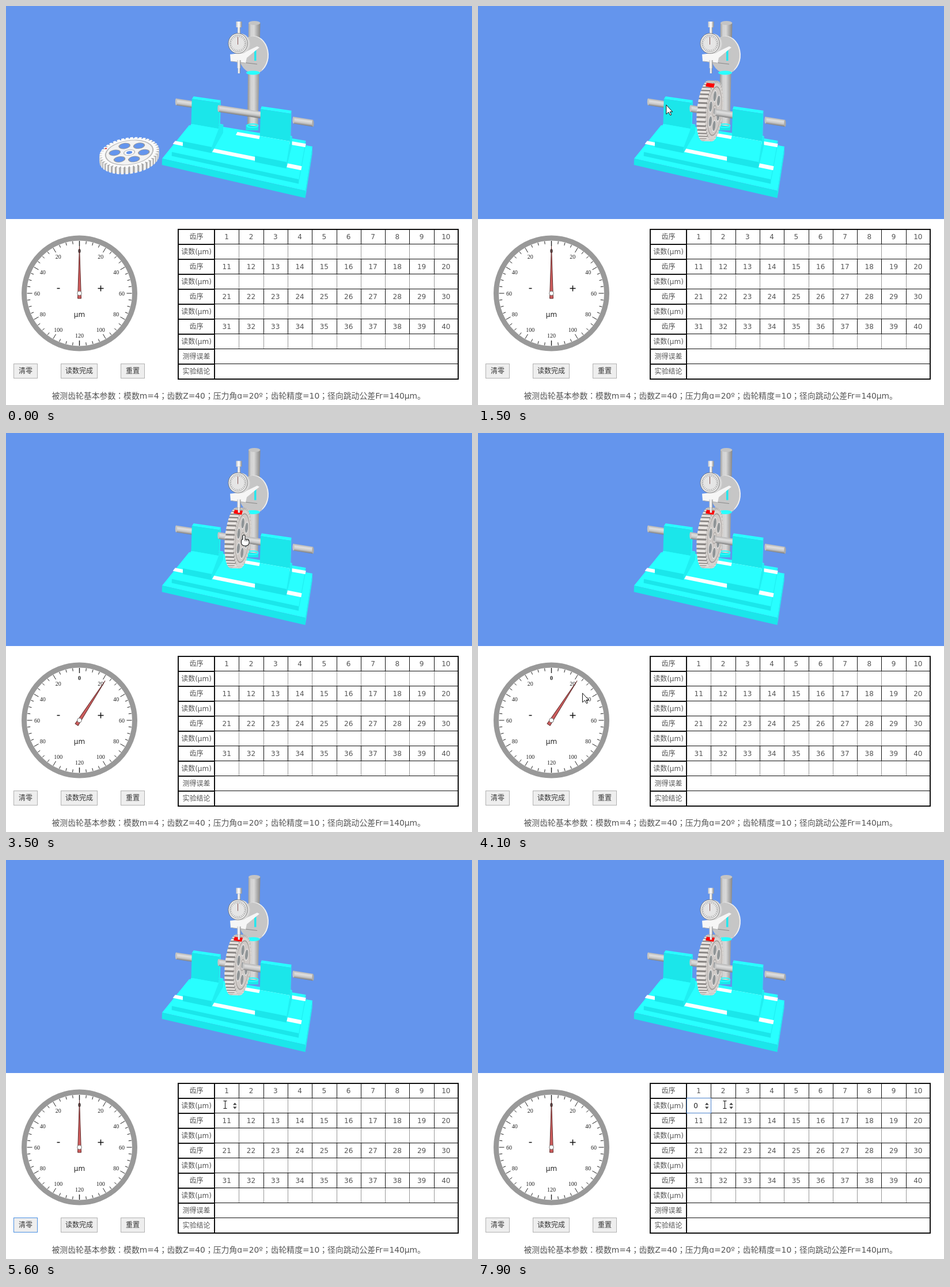
Recreate the animation shown at these times as an HTML page with a canvas. Size 809 px wide and 693 px high, loop 8 s.

```html
<!DOCTYPE html>
<html>
<head>
<meta charset="utf-8">
<title>齿轮径向跳动测量</title>
<style>
  html, body { margin: 0; width: 100%; height: 100%; overflow: hidden; background: #fff; }
  canvas { display: block; }
</style>
</head>
<body>
<canvas id="stage" width="809" height="693"></canvas>
<script>
const ctx = document.getElementById('stage').getContext('2d');
const LOOP = 8000, TAU = Math.PI * 2;
const SANS = '"DejaVu Sans", "Noto Sans CJK SC", sans-serif';
const PARAMS = '"DejaVu Sans", "Noto Sans CJK JP", sans-serif';
const SERIF = '"Liberation Serif", serif';
const SKY = '#6495ed', TOP = '#28ffff', FRONT = '#1be6ea', SIDE = '#20eff2';
const clamp = v => Math.max(0, Math.min(1, v));
const mix = (a, b, p) => a + (b - a) * p;

function poly(fill, points, stroke) {
  ctx.beginPath();
  for (const [x, y] of points) ctx.lineTo(x, y);
  ctx.closePath();
  ctx.fillStyle = fill;
  ctx.fill();
  if (stroke) { ctx.strokeStyle = stroke; ctx.lineWidth = 1; ctx.stroke(); }
}
function line(color, width, x1, y1, x2, y2) {
  ctx.strokeStyle = color;
  ctx.lineWidth = width;
  ctx.beginPath();
  ctx.moveTo(x1, y1);
  ctx.lineTo(x2, y2);
  ctx.stroke();
}
function oval(fill, x, y, rx, ry = rx, rot = 0, stroke, width = 1) {
  ctx.beginPath();
  ctx.ellipse(x, y, rx, ry, rot, 0, TAU);
  if (fill) { ctx.fillStyle = fill; ctx.fill(); }
  if (stroke) { ctx.strokeStyle = stroke; ctx.lineWidth = width; ctx.stroke(); }
}
function rect(fill, x, y, w, h) {
  ctx.fillStyle = fill;
  ctx.fillRect(x, y, w, h);
}
function frame(color, x, y, w, h, width = 1) {
  ctx.strokeStyle = color;
  ctx.lineWidth = width;
  ctx.strokeRect(x, y, w, h);
}
function text(str, x, y, font, color, align = 'center') {
  ctx.font = font;
  ctx.fillStyle = color;
  ctx.textAlign = align;
  ctx.fillText(str, x, y);
}
function shade(x1, y1, x2, y2, ...colors) {
  const g = ctx.createLinearGradient(x1, y1, x2, y2);
  colors.forEach((c, i) => g.addColorStop(i / (colors.length - 1), c));
  return g;
}
function ticks(count, cx, cy, draw) {
  for (let i = 0; i < count; i++) {
    const s = Math.sin(i / count * TAU), c = Math.cos(i / count * TAU);
    draw(i, r => [cx + r * s, cy - r * c]);
  }
}

// Bench space: x along the base, z into the depth (both 0..1), h above it in pixels.
function project(x, z, h) {
  const gx = mix(mix(271, 520, x), mix(318, 532, x), z);
  const gy = mix(mix(265, 321, x), mix(207, 244, x), z);
  return [gx + h * .03, gy - h * (1 + .14 * x)];
}

// Extrudes a (z, h) outline, listed from front to back, along x.
function prism(x0, x1, outline) {
  for (let i = outline.length - 2; i >= 0; i--) {
    const [a, b] = [outline[i], outline[i + 1]], upright = a[0] === b[0];
    if (upright && b[1] < a[1]) continue;
    poly(upright ? FRONT : TOP,
      [project(x0, ...a), project(x1, ...a), project(x1, ...b), project(x0, ...b)]);
  }
  poly(SIDE, outline.map(p => project(x1, ...p)));
}
const slab = (x0, x1, z0, z1, h0, h1) => prism(x0, x1, [[z0, h0], [z0, h1], [z1, h1], [z1, h0]]);
const stock = (x0, x1) => prism(x0, x1,
  [[.3, 7], [.3, 17], [.62, 28], [.62, 71], [.69, 71], [.69, 30], [.85, 21], [.85, 7]]);
const strip = (x0, z0, z1) => poly('#fff',
  [project(x0, z0, 7), project(.95, z0, 7), project(.95, z1, 7), project(x0, z1, 7)]);

function rod(x0, x1) {
  const [ax, ay] = project(x0, .65, 59.5), [bx, by] = project(x1, .65, 59.5), r = 6;
  const fill = shade(ax, ay - r, ax - 1.7, ay + r, '#b4b4b4', '#e0e0e0', '#c8c8c8', '#808080');
  poly(fill, [[ax, ay - r], [bx, by - r], [bx, by + r], [ax, ay + r]]);
  oval('#c4c4c4', ax, ay, 1.6, r);
  oval('#aaa', bx, by, 1.6, r);
}

function pin(x, y0, y1, w) {
  rect(shade(x - w / 2, 0, x + w / 2, 0, '#c8c8c8', '#fff', '#8c8c8c'), x - w / 2, y0, w, y1 - y0);
}

// A 40-tooth wheel seen at an angle, extruded by (dx, dy).
function gear(cx, cy, rx, ry, rot, dx, dy, look) {
  const c = Math.cos(rot), s = Math.sin(rot), step = TAU / 40;
  const at = (a, r, k = 0) => {
    const x = r * rx * Math.cos(a), y = r * ry * Math.sin(a);
    return [cx + x * c - y * s + k * dx, cy + x * s + y * c + k * dy];
  };
  const outline = k => {
    const pts = [];
    for (let i = 0; i < 40; i++)
      for (const [o, r] of [[-.44, .91], [-.27, 1], [.27, 1], [.44, .91]])
        pts.push(at((i + o) * step, r, k));
    return pts;
  };
  for (let k = 1; k > 0; k -= .08) poly(look.gap, outline(k));
  for (let i = 0; i < 40; i++) {
    const a = i * step, [x, y] = at(a, 1);
    if ((x - cx) * dx + (y - cy) * dy < -90) continue;
    const l = a - .3 * step, r = a + .3 * step;
    poly(look.tip, [at(l, 1), at(r, 1), at(r, 1, 1), at(l, 1, 1)]);
  }
  poly(look.face, outline(0));
  const ring = (fill, r, a = 0, d = 0) => oval(fill, ...at(a, d), rx * r, ry * r, rot);
  ring(look.rim, .82);
  ring(look.web, .78);
  for (let i = 0; i < 6; i++) {
    const a = i * TAU / 6 + .27;
    ring(look.edge, .2, a, .5);
    ring(look.hole, .17, a, .5);
  }
  ring(look.rim, .2);
  ring(look.face, .17);
  ring(look.hole, .1);
}
const flat = { gap: '#a5a5a5', tip: '#f2f2f2', face: '#fafafa', rim: '#b9b9b9', web: '#f3f3f3',
  hole: SKY, edge: '#999' };
const upright = { gap: '#8b8785', tip: '#e9e5e2', face: '#d6d2cf', rim: '#a19c99', web: '#cfcac7',
  hole: '#8f9496', edge: '#eee' };

function column() {
  rect(FRONT, 416.5, 206, 21.5, 10);
  poly(shade(420, 0, 441, 0, '#989898', '#d2d2d2', '#d8d8d8', '#b0b0b0', '#8a8a8a'),
    [[421, 29], [441.5, 29], [437.5, 209], [419, 207]]);
  oval('#c4c4c4', 431.2, 29.5, 10.2, 3.5);
  oval(null, 428, 208, 9.5, 3, 0, TOP, 2);
}

function bracket() {
  oval('#efefef', 431, 84.5, 25, 32.5, -.05);
  oval('#c6c6c6', 429, 84.5, 25, 32, -.05);
  poly('#c6c6c6', [[410, 95], [450, 99], [443, 114], [419, 113]]);
  oval(TOP, 429, 116, 12, 3.5);
  rect('#22e8ee', 431, 75, 3.5, 20);
  line('#888', 1, 415, 98.5, 436, 101);
}

function gauge() {
  poly('#f6f6f6', [[389, 84], [413, 81], [436, 70], [440, 72], [418, 90], [416, 99], [390, 96]]);
  line('#aaa', 1, 391, 96, 415, 99);
  pin(404.5, 27, 37, 10);
  pin(404.5, 37, 49, 5);
  pin(404.5, 94, 108, 6);
  pin(404.5, 108, 117, 4);
  oval('#d8d8d8', 407, 65.5, 16.5, 17.5);
  oval('#f4f4f4', 402.5, 65, 16.5, 17.5, 0, '#777');
  oval('#e5e5e5', 402.5, 65, 14, 15, 0, '#aaa');
  ticks(24, 402.5, 65, (i, at) => line('#777', .6, ...at(11), ...at(13.5)));
  line('#855', 1, 402.5, 54, 402.5, 67);
}

function lowered(by, draw) {
  ctx.save();
  ctx.translate(0, by);
  draw();
  ctx.restore();
}

function scene(t) {
  const drop = 21.5 * clamp((t - 2800) / 400);
  rect(SKY, 0, 0, 809, 370);
  slab(0, 1, 0, 1, -11, 0);
  slab(.045, .945, .12, 1, 0, 7);
  strip(.4, .855, .935);
  strip(.012, .33, .42);
  column();
  lowered(drop, bracket);
  rod(-.035, .1);
  stock(.09, .3);
  rod(.29, .66);
  if (t >= 800) {
    gear(410.5, 182.5, 15, 53, .1, -15.5, -.5, upright);
    poly('#f00', [[397, 133.5], [411, 135], [409, 142], [395, 139.5]]);
    rod(.48, .66);
  } else {
    gear(214, 254.5, 52, 26, -.15, 0, 11, flat);
    oval('#d22', 173.5, 247.5, 1.8, 1);
  }
  lowered(drop, gauge);
  stock(.615, .845);
  rod(.865, 1.015);
}

function dial(t) {
  const cx = 127.5, cy = 499;
  oval('#fff', cx, cy, 96, 96, 0, '#999', 9);
  ticks(48, cx, cy, (i, at) => line('#222', i % 24 ? 1 : 1.4, ...at(91), ...at(i % 4 ? 86 : 82)));
  ticks(12, cx, cy, (i, at) => {
    const [x, y] = at(73.5);
    text(Math.min(i, 12 - i) * 20, x, y + 3.5, (i ? '' : 'bold ') + '10px ' + SERIF, '#222');
  });
  text('μm', cx, 540, '12px ' + SANS, '#222');
  line('#111', 1.5, 88.5, 490.5, 93.5, 490.5);
  line('#111', 1.5, 159.5, 490.5, 169.5, 490.5);
  line('#111', 1.5, 164.5, 485.5, 164.5, 495.5);
  const tilt = t < 4800 ? 33 * clamp((t - 3000) / 200) : 0;
  ctx.save();
  ctx.translate(cx, cy);
  ctx.rotate(tilt * TAU / 360);
  poly('#cd5c5c', [[0, -82], [3, 9], [-3, 9]], '#633');
  ctx.restore();
  oval('#fff', cx, cy, 3.8, 3.8, 0, '#777');
}

function button(label, x, w, focused) {
  rect('#eee', x, 621, w, 26);
  frame(focused ? '#4a90e2' : '#b2b2b2', x + .5, 621.5, w - 1, 25);
  text(label, x + w / 2, 638, '12px ' + SANS, '#333');
}

const grid = { left: 299, mid: 362, right: 785, top: 388, row: 26, col: 42.3 };

function spinner(col) {
  const x = grid.mid + (col + 1) * grid.col - 7;
  for (const d of [-1, 1])
    poly('#444', [[x - 3.3, 427 + d * 1.5], [x + 3.3, 427 + d * 1.5], [x, 427 + d * 5.5]]);
}

function table(t, mouse) {
  const { left, mid, right, top, row, col } = grid, font = '12px ' + SANS;
  for (let r = 0; r < 10; r++) {
    const y = top + r * row, reading = r % 2;
    const label = r > 7 ? ['测得误差', '实验结论'][r - 8] : reading ? '读数(μm)' : '齿序';
    text(label, 330.5, y + 17, font, '#555');
    if (r) {
      rect('#111', left, y - 1, mid - left, 2);
      rect('#111', mid, y - 1, right - mid, 1);
    }
    for (let c = 0; c < 10 && r < 8; c++) {
      if (c) rect(reading ? '#999' : '#111', Math.round(mid + c * col), y, 1, row - 1);
      if (!reading) text(r * 5 + c + 1, mid + (c + .5) * col, y + 17, font, '#555');
    }
  }
  rect('#111', mid - 1, top, 2, row * 10);
  frame('#111', left, top, right - left, row * 10, 2);

  const focused = t >= 5700, typed = t >= 7200;
  const hover = mouse.shape === 'beam' ? Math.floor((mouse.x - mid) / col) : -1;
  if (hover >= 0) spinner(hover);
  if (!focused) return;
  if (hover) spinner(0);
  frame('#4a7fc8', mid + .5, 413.5, 42, 26);
  if (typed) text('0', 378, 431, font, '#222');
  const blink = typed ? t - 7200 < 600 : (t - 5700) % 1000 < 500;
  if (blink) rect('#222', typed ? 382 : 378, 420, 1, 14);
}

// Places where the pointer rests: arrival, departure, x, y.
const stops = [
  [100, 100, 760, 84], [500, 900, 178, 251], [1900, 2800, 426, 119], [3500, 3500, 413, 177],
  [4500, 4900, 27, 635], [5600, 7400, 380, 425], [7900, LOOP, 428, 425]
];
function mouseAt(t) {
  const i = stops.findLastIndex(s => s[0] <= t);
  if (i < 0) return { shape: 'none' };
  const [, leave, x0, y0] = stops[i], next = stops[i + 1] || stops[i];
  const moving = t > leave, p = moving ? (t - leave) / (next[0] - leave) : 0;
  const x = mix(x0, next[2], p), y = mix(y0, next[3], p);
  const inCell = x > grid.mid && y > 414 && y < 440;
  return { x, y, shape: inCell ? 'beam' : moving || t === 100 ? 'arrow' : 'hand' };
}

const cursors = {
  none() {},
  arrow() {
    poly('#fff', [[0, 0], [0, 16], [4, 12.5], [7, 18], [9, 17], [6.5, 12], [11, 12]], '#111');
  },
  hand() {
    ctx.beginPath();
    ctx.roundRect(-1.5, .5, 3, 12, 1.5);
    ctx.roundRect(-4, 8, 12.5, 10.5, [3, 3, 5, 5]);
    ctx.strokeStyle = '#111';
    ctx.lineWidth = 2;
    ctx.stroke();
    ctx.fillStyle = '#fff';
    ctx.fill();
    for (const x of [2, 4.5, 7]) line('#111', .8, x, 8, x, 11);
  },
  beam() {
    line('#111', 1, .5, -6, .5, 6);
    for (const y of [-6.5, 6.5]) line('#111', 1, -2.5, y, 3.5, y);
  }
};

function draw(now) {
  const t = Math.floor(now % LOOP / 100) * 100, mouse = mouseAt(t);
  rect('#fff', 0, 0, 809, 693);
  scene(t);
  dial(t);
  button('清零', 13, 42, t >= 4700 && t < 5700);
  button('读数完成', 95, 64);
  button('重置', 199, 42);
  table(t, mouse);
  text('被测齿轮基本参数：模数m=4；齿数Z=40；压力角ɑ=20º；齿轮精度=10；径向跳动公差Fr=140μm。',
    79.5, 682, '13.85px ' + PARAMS, '#555', 'left');
  ctx.save();
  ctx.translate(mouse.x || 0, mouse.y || 0);
  cursors[mouse.shape]();
  ctx.restore();
  requestAnimationFrame(() => draw(performance.now()));
}
draw(performance.now());
</script>
</body>
</html>
```
